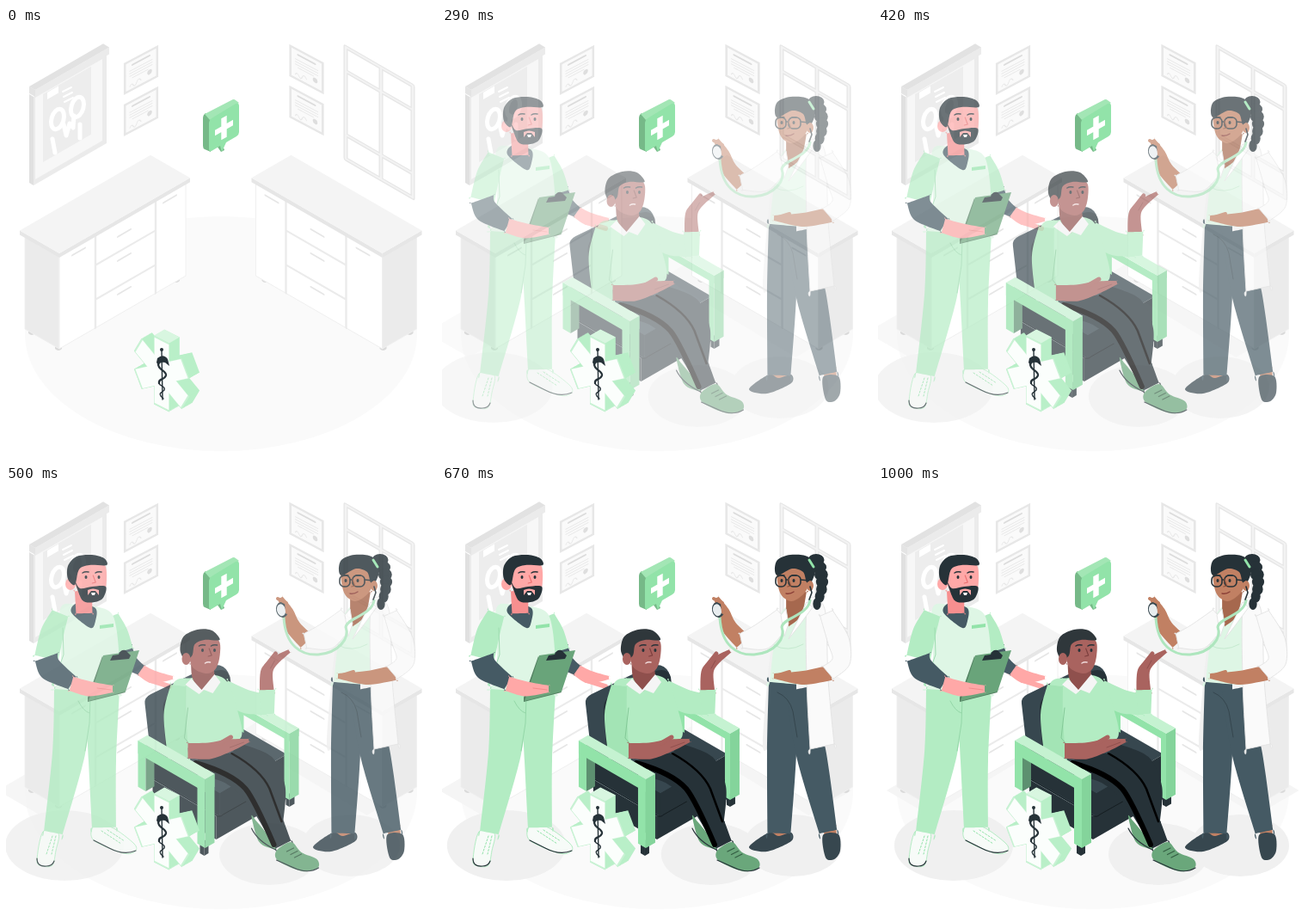
An HTML page that plays this animation: 500x500 px, repeating every 1040 ms.

```html
<!DOCTYPE html>
<html lang="en">
<head>
<meta charset="utf-8">
<title>Clinic visit</title>
<style>
html, body { margin: 0; width: 100%; height: 100%; overflow: hidden; background: #fff; }
svg { display: block; width: 100%; height: 100%; }
</style>
</head>
<body>
<svg id="stage" viewBox="0 0 500 500"></svg>
<script>
const LOOP = 1040, ISO = .577;
const INK = '#263238', SLATE = '#455a64', MINT = '#b3ecc3', GREEN = '#92e3a9', PALE = '#def6e5';

const path = (fill, d, extra = '') => `<path fill="${fill}" d="${d}" ${extra}/>`;
const poly = (fill, pts, extra = '') => path(fill, `M${pts}Z`, extra);
const line = (color, width, d, extra = '') =>
  path('none', d, `stroke="${color}" stroke-width="${width}" stroke-linecap="round" stroke-linejoin="round" ${extra}`);
const oval = (fill, cx, cy, rx, ry = rx, extra = '') =>
  `<ellipse fill="${fill}" cx="${cx}" cy="${cy}" rx="${rx}" ry="${ry}" ${extra}/>`;
const group = (attrs, ...parts) => `<g ${attrs}>${parts.join('')}</g>`;
const repeat = (n, draw) => Array.from({ length: n }, (_, i) => draw(i)).join('');
const parse = text => text.split(' ').map(s => s.split(',').map(Number));

// Closed smooth curve through the points; a repeated point makes a corner.
function soft(fill, pts, extra = '') {
  const p = typeof pts === 'string' ? parse(pts) : pts;
  const at = i => p[(i + p.length) % p.length];
  const handle = (o, u, v) => o.map((c, k) => c + (v[k] - u[k]) / 6.5);
  const curves = p.map((b, i) =>
    `C${handle(b, at(i - 1), at(i + 1))} ${handle(at(i + 1), at(i + 2), b)} ${at(i + 1)}`);
  return path(fill, `M${p[0]}${curves.join('')}Z`, extra);
}

// Tapering limb along a spine of x,y,width points, cut flat at both ends.
function limb(fill, spine, extra = '') {
  const p = parse(spine), last = p.length - 1;
  const side = sign => p.map(([x, y, w], i) => {
    const a = p[Math.max(0, i - 1)], b = p[Math.min(last, i + 1)];
    const dx = b[0] - a[0], dy = b[1] - a[1], k = sign * w / 2 / Math.hypot(dx, dy);
    return [x - dy * k, y + dx * k];
  });
  const ends = s => [s[0], ...s, s[last]];
  return soft(fill, [...ends(side(1)), ...ends(side(-1)).reverse()], extra);
}

// Isometric box hung from the near top corner.
function box(x, y, left, right, height, [topFill, leftFill, rightFill], extra = '') {
  const dl = ISO * left, dr = ISO * right;
  return poly(leftFill, `${x} ${y}l${-left} ${-dl}v${height}l${left} ${dl}`, extra) +
    poly(rightFill, `${x} ${y}l${right} ${-dr}v${height}l${-right} ${dr}`, extra) +
    poly(topFill, `${x} ${y}l${-left} ${-dl}l${right} ${-dr}l${left} ${dl}`);
}

function chart() {
  const ring = (x, y) => oval('none', x, y, 7, 12, `stroke="#fff" stroke-width="5" transform="rotate(16 ${x} ${y})"`);
  return box(32, 80, 5, 85, 103, ['none', '#e0e0e0', '#ebebeb']) +
    box(34, 81, 0, 78, 95, ['none', 'none', '#f7f7f7']) +
    box(43, 77, 0, 56, 79, ['none', 'none', '#ededed']) +
    box(34, 72, 7, 86, 8, ['#e2e2e2', '#e4e4e4', '#ebebeb']) +
    box(48, 75, 0, 13, 8, ['none', 'none', '#fff']) +
    repeat(3, i => line('#fff', 2, `M${66 + i} ${74 + i * 6}l10 -5`)) +
    ring(60, 106) + ring(83, 92) +
    line('#fff', 5, 'M67 112L70 125L74 111L78 116L79 102M54 129L57 145M86 112V128');
}

function certificate(matrix) {
  return group(`transform="matrix(${matrix})"`,
    '<rect x="1.2" y="1.2" width="37.6" height="34.5" fill="#fafafa" stroke="#e7e7e7" stroke-width="2.6"/>',
    line('#dcdcdc', 2, 'M10 7H30'),
    repeat(3, i => line('#e8e8e8', 1, `M7 ${13 + i * 3}H33`)),
    line('#e8e8e8', 1, 'M10 22H28M7 31Q9 27 11 31T15 30T20 30'),
    oval('#dedede', 30, 26, 2.8));
}

function windowFrame() {
  const bars = 'M2 2H80V132H2ZM43 2V132M2 30H80M2 104H80';
  return group(`transform="matrix(1,${ISO},0,1,393,19)"`, line('#e6e6e6', 5, bars), line('#f3f3f3', 2.4, bars));
}

function cabinet() {
  const handle = (u, v) => line('#e6e6e6', 2, `M${u} ${v}h15`);
  return [[30, 351], [61, 369], [198, 290]].map(([x, y]) => path('#dadada', `M${x - 4} ${y}h8v4q-4 4 -8 0Z`)).join('') +
    box(62, 264, 40, 147, 109, ['none', '#ebebeb', '#fff'], 'stroke="#f0f0f0"') +
    group(`transform="matrix(1,${-ISO},0,1,62,264)"`,
      line('#ebebeb', 2.4, 'M42 0V109M112 0V109M42 36h70M42 76h70'),
      handle(15, 9), handle(121, 9), [18, 46, 85].map(v => handle(68, v)).join('')) +
    box(62, 262, 46, 152, 5, ['#f4f4f4', '#e6e6e6', '#e6e6e6']);
}

function bubble() {
  return path('#76b988', 'M229 105Q229 101 232 99L238 104V144L231 141Q229 140 229 137ZM245 137L250 144L254 142L251 134Z') +
    path('#a3e6b5', 'M231 100L262 84Q265 82 267 84L271 87L237 107Z') +
    path(GREEN, 'M236 110Q236 107 239 105L267 88Q271 86 271 91V121Q271 124 268 126L256 133L251 144L249 137L239 143Q236 144 236 141Z') +
    group(`transform="matrix(1,${-ISO},0,1,253.5,116)"`,
      '<path fill="none" stroke="#fff" stroke-width="6.4" d="M-10.5 0h21M0 -12.5v25"/>');
}

function star() {
  const bars = extra => repeat(3, i => `<rect x="-11" y="-40" width="22" height="80" transform="rotate(${i * 60})" ${extra}/>`);
  const face = (dx, dy, ...parts) => group(`transform="matrix(.8,.4,0,1,${181 + dx},${402 + dy})"`, ...parts);
  return repeat(13, i => face(12 - i, (i - 12) * ISO, bars('fill="#b9efc8"'))) +
    poly('#d8f6e0', '172.2 357.6l12 -7l17.6 8.8l-12 7') +
    face(0, 0, bars('fill="#c9f2d4"'), group('transform="scale(.95)"', bars('fill="#fbfefc"'))) +
    line(INK, 1.4, 'M181 374L182 432') + oval(INK, 181, 374, 2) +
    path(INK, 'M176 384Q183 378 188 385L190 393L185 389Q178 388 178 393L175 389Z') +
    line(INK, 2.3, 'M177 390C176 398 187 398 186 404C184 410 177 407 178 413') +
    line(INK, 1.4, 'M178 413C179 417 186 416 184 421C180 425 178 424 180 428L183 431');
}

// Eyes, brows and nose of a head turned to the right.
function features(x, y, gap, nose) {
  return [0, gap].map(d => oval(INK, x + d, y, 1.5, 1.9) + line(INK, 1.5, `M${x + d - 4} ${y - 5}q3 -2 7 -1`)).join('') +
    line(nose, 1.1, `M${x + gap * .55} ${y - 2}l3 8l-4 1`);
}

function nurse() {
  const skin = '#ffa8a7', sole = `stroke="${MINT}"`;
  return soft('#f7fbf8', '43,402 61,404 58,424 54,441 43,442 36,436', sole) +
    soft('#f7fbf8', '102,396 123,397 149,416 150,425 136,427 102,412', sole) +
    line(INK, 1.2, 'M36 433Q36 443 47 442Q54 442 56 436M102 412L120 421Q137 430 151 424') +
    line(GREEN, 1, 'M54 407L47 428M58 407L53 428M111 401L134 416M118 400L138 413', 'stroke-dasharray="2 2"') +
    limb(MINT, '79,235,46 73,310,38 55,403,22') + limb(MINT, '112,238,40 112,320,32 114,397,28') +
    line('#94d7a8', 1, 'M98 246L97 276L92 308M84 250Q90 262 97 264') +
    limb(skin, '155,213,13 171,222,15 194,223,4') + line(skin, 6, 'M168 226L190 233') +
    limb(SLATE, '138,188,17 144,205,19 157,214,13') +
    limb(MINT, '124,151,14 132,170,19 139,191,18') +
    soft(PALE, '63,143 83,138 104,140 124,150 131,190 130,241 130,241 57,236 57,236 64,205') +
    limb(MINT, '63,148,20 54,170,27 47,200,28') + line('#9edcb0', 1, 'M66 165L67 196L61 213') +
    poly(GREEN, '109 162l16 -2v4l-16 2') +
    soft(SLATE, '76,147 83,136 104,142 104,157 98,165') +
    limb('#f78f8f', '90,122,20 91,148,19') +
    poly('#527f60', '112 198L95 246V251L139 240') + poly('#69a47a', '113 197L155 191L139 239L96 250') +
    path(INK, 'M121 203L124 197L131 196Q133 190 139 191L145 197L143 201Z') +
    limb(SLATE, '47,199,28 52,213,28 77,229,17') +
    limb(skin, '76,230,17 98,236,17 124,236,8') + line('#f08484', .8, 'M106 235L122 237') +
    soft(skin, '78,98 94,86 115,92 116,119 108,132 88,130') + oval(skin, 75, 114, 6, 7) +
    soft(INK, '72,108 72,93 82,82 100,80 114,84 117,92 97,92 85,97 80,115') +
    soft(INK, '80,110 86,119 100,117 116,117 113,130 103,135 89,133') +
    path(skin, 'M95 127V121Q101 118 108 121V127L104 122H99Z') + poly('#fff', '99 124h5l-1 3h-3') +
    features(93, 106, 15, '#ea6f70');
}

function doctor() {
  const skin = '#c18063', coat = '#fafafa', rim = 'stroke="#e3e3e3" stroke-width=".9"';
  const braid = repeat(7, i => oval(INK, 435 + 7 * Math.sin(i / 2), 86 + i * 8.5, 9.5 - i * .8, 7));
  const lens = (x, w) => `<rect x="${x}" y="104" width="${w}" height="13" rx="5"/>`;
  return limb(skin, '392,394,16 392,408,18') + limb(skin, '451,396,14 452,411,15') +
    soft('#37474f', '357,420 380,403 391,407 406,403 406,413 378,425') +
    soft('#37474f', '443,406 461,405 463,424 456,434 446,432') +
    soft('#f0f0f0', '383,186 392,190 383,260 380,300 373,298') +
    limb(SLATE, '396,228,32 395,310,34 392,404,27') + limb(SLATE, '414,236,28 429,310,35 449,402,21') +
    line('#35464e', 1, 'M390 240Q404 246 408 262L413 292') +
    soft(PALE, '393,150 424,140 428,232 428,232 381,228 381,228') + line('#c5eacf', 1, 'M386 185Q402 194 420 184') +
    soft(coat, '425,136 445,143 449,225 456,300 456,300 428,306 428,306 424,225', rim) +
    limb(skin, '452,217,18 420,223,16 386,221,6') + line(skin, 4, 'M404 216L388 221') +
    limb(coat, '447,148,16 461,180,25 464,204,21 449,217,19', rim) +
    limb(skin, '350,181,20 334,164,18 327,146,14 319,130,6') +
    limb(coat, '397,152,22 372,175,31 348,180,17', rim) +
    limb('#a6684e', '412,122,24 409,148,18 402,162,4') +
    poly('#fff', '424 135L431 141L414 164L403 178', rim) + poly('#fff', '400 143L394 150L398 175L403 160', rim) +
    braid +
    line('#aee6be', 3, 'M323 153C325 186 343 197 363 196C387 194 400 177 395 164C397 153 425 151 428 133') +
    group('transform="rotate(-15 321 144)"', oval('#37474f', 321, 144, 7, 9), oval('#e8edef', 320, 144, 5, 7)) +
    line(skin, 4, 'M316 131L326 136L327 147') +
    soft(skin, '390,96 408,90 424,95 427,113 420,126 406,134 393,124') +
    soft(INK, '387,98 390,86 405,80 425,82 434,96 430,111 424,112 420,100 407,96 391,104') +
    line(GREEN, 3, 'M427 86L432 94') +
    oval(skin, 428, 116, 4, 6) + line(INK, 1.6, 'M428 117L430 124L427 132') +
    group(`fill="none" stroke="${INK}" stroke-width="1.6"`, lens(388, 12), lens(403, 14),
      '<path d="M400 109H403M417 109L427 110"/>') +
    features(395, 110, 14, '#8f523b') + line('#8a3f38', 1.4, 'M400 125Q405 126 409 123');
}

function chair() {
  const green = ['#c5f2d1', GREEN, '#84d49b'], dark = ['#37474f', INK, INK];
  return box(335, 362, 4, 6, 11, [INK, INK, INK]) +
    path('#37474f', 'M167 253Q166 246 174 242L242 209Q258 205 264 217L270 250L195 315L173 306Z') +
    path(INK, 'M188 258Q188 248 197 243L246 216Q262 210 266 222L271 262L230 310L192 318Z') +
    box(250, 384, 74, 82, 27, dark) + box(254, 357, 78, 78, 27, dark) +
    line('#151d21', 1, 'M178 341L250 383Q254 386 258 382L332 340') +
    box(282, 257, 9, 0, 30, green) + box(335, 288, 73, 11, 9, green) + box(335, 288, 6, 11, 77, green);
}

function armrest() {
  const green = ['#c5f2d1', GREEN, '#84d49b'];
  return box(236, 417, 5, 5, 13, [INK, INK, INK]) +
    box(168, 301, 9, 10, 54, ['none', GREEN, '#5d9070']) +
    box(237, 341, 78, 11, 15, green) + box(237, 341, 9, 11, 80, green);
}

function patient() {
  const skin = '#a9635f', shoe = '#6aa77b';
  return soft(shoe, '291,384 297,390 318,416 318,422 300,414') +
    limb(INK, '270,308,22 304,327,32 320,352,21 321,390,14') +
    limb(INK, '228,326,20 268,329,36 300,362,30 328,417,20') +
    line('#000', 6, 'M226 322Q268 334 284 352Q294 364 317 417') +
    line('#000', 2.5, 'M268 311Q302 330 312 352L326 390') +
    soft(shoe, '320,424 337,414 349,426 367,434 368,444 350,448 322,436') +
    line(INK, 1.2, 'M320 435L338 443Q356 452 369 444M291 398Q298 413 319 423') +
    repeat(3, i => line('#345e43', 1.2, `M${332 + i * 4.5} ${425 + i * 3.5}l8 -4`)) +
    limb(skin, '309,240,17 309,215,14 320,202,9 335,192,4') + line(skin, 5, 'M308 209L319 195') +
    limb(MINT, '258,238,26 286,251,27 310,254,24') + limb(MINT, '310,265,15 309,237,19') +
    soft(MINT, '200,230 222,223 248,220 263,228 273,255 279,292 248,302 218,305 196,280') +
    limb('#a3e4b5', '206,232,18 202,266,26 206,317,24') + line('#83c997', 1, 'M217 258L213 293L219 300') +
    limb(skin, '217,308,18 242,308,19 264,302,15 288,296,4') + line(skin, 5, 'M255 299L267 292') +
    line('#8a4b49', .8, 'M266 304L282 298M318 203L313 212') +
    limb('#8f504d', '233,206,25 235,224,25 233,238,3') +
    poly('#f5f5f5', '214 231L221 224L233 237L248 219L255 228L246 241L236 237L230 242') +
    soft(skin, '219,186 236,176 253,180 254,198 249,213 238,218 222,210') +
    soft('#2f373b', '208,191 212,175 228,167 245,168 254,179 236,179 225,184 222,197 214,202') +
    oval(skin, 215, 201, 5, 7) + features(234, 191, 14, '#7b3e3d') +
    line('#f0dada', 1.5, 'M237 206Q240 204 243 205');
}

function shadows() {
  const floor = poly('#f5f5f5', '10 354L168 262L214 290L60 383');
  return floor + mirror(floor) +
    [[88, 418, 69, 41], [326, 428, 58, 36], [421, 418, 57, 36]].map(e => oval('#f0f0f0', ...e)).join('');
}

const mirror = part => group('transform="matrix(-1,0,0,1,499.5,0)"', part);

const stage = document.getElementById('stage');
stage.innerHTML = oval('#fafafa', 250, 355.5, 228, 136.5) +
  group('id="shade"', shadows()) +
  chart() + windowFrame() +
  [0, 48].map(drop => certificate(`1,-.53,0,1,137,${41 + drop}`) + certificate(`1,.53,0,1,329.5,${19 + drop}`)).join('') +
  cabinet() + mirror(cabinet()) +
  group('id="staff"', nurse(), doctor()) +
  group('id="seated"', chair(), patient(), armrest()) +
  bubble() + star();

const [shade, staff, seated] = ['shade', 'staff', 'seated'].map(id => document.getElementById(id));

function ease(t, from, to) {
  const k = Math.min(1, Math.max(0, (t - from) / (to - from)));
  return k * k * (3 - 2 * k);
}

function render(t) {
  const fade = Math.min(1, t / 620);
  for (const part of [shade, staff, seated]) part.setAttribute('opacity', fade);
  const slide = 30 * (ease(t, 0, 690) - 1) + 2 * (ease(t, 660, 830) - ease(t, 830, 1000));
  seated.setAttribute('transform', `translate(${slide})`);
  shade.setAttribute('transform', `translate(${Math.min(0, t / 25 - 40)})`);
}

const start = performance.now();
function tick() {
  render((performance.now() - start) % LOOP);
  requestAnimationFrame(tick);
}
tick();
</script>
</body>
</html>
```
